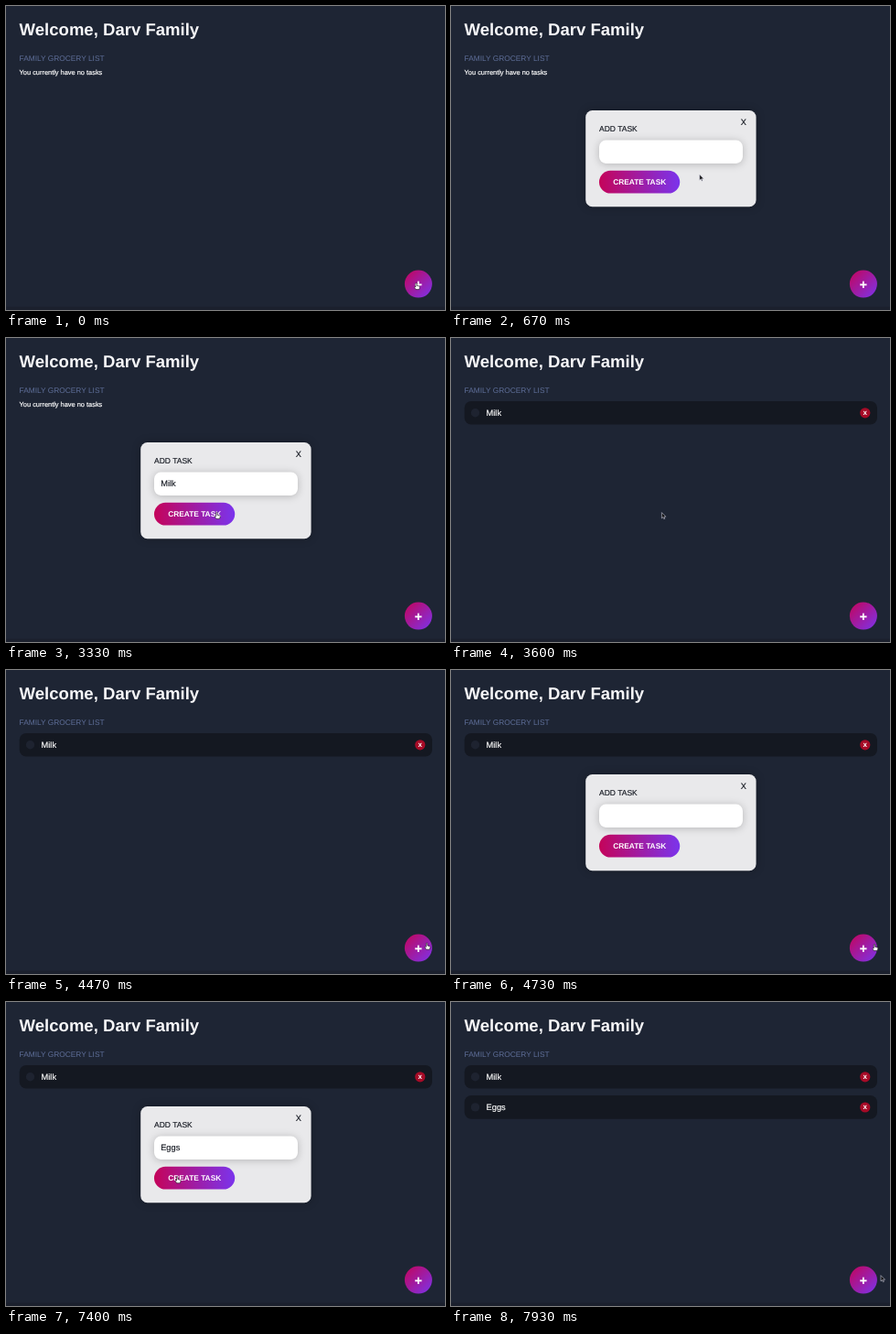
An HTML page for the animation above (8000 ms loop, 480 by 332 pixels).

```html
<!DOCTYPE html>
<html lang="en">
<head>
<meta charset="utf-8">
<title>Grocery list</title>
<style>
  html, body { margin: 0; width: 100%; height: 100%; overflow: hidden; background: #1e2534; }
  svg { display: block; width: 100vw; height: 100vh; }
  text { font-family: "Liberation Sans", Arial, Helvetica, sans-serif; font-size: 9.28px; text-rendering: geometricPrecision; white-space: pre; }
  .light { fill: #fff; stroke: #fff; stroke-width: .18px; }
  .dark { fill: #10141d; stroke: #10141d; stroke-width: .12px; }
  .bold { font-weight: 700; text-anchor: middle; fill: #fff; }
  .panel { filter: drop-shadow(0 0 4px rgba(0, 0, 0, .3)); }
  .field { filter: drop-shadow(0 1.5px 4px rgba(0, 0, 0, .22)); }
</style>
</head>
<body>
<svg viewBox="0 0 480 332">
  <defs>
    <linearGradient id="across"><stop stop-color="#c4045a"/><stop offset="1" stop-color="#7b34ec"/></linearGradient>
    <linearGradient id="diagonal" x2="1" y2="1"><stop stop-color="#c4045a"/><stop offset="1" stop-color="#7b34ec"/></linearGradient>
    <g id="row">
      <rect x="14.7" y="68.9" width="451.3" height="25.6" rx="7.4" fill="#141821"/>
      <circle cx="26.5" cy="81.7" r="4.7" fill="#1e2330"/>
      <circle cx="452.8" cy="81.8" r="5.6" fill="#a60b27"/>
      <text class="bold" x="452.8" y="84.1" style="font-size:8px">x</text>
    </g>
  </defs>

  <rect width="480" height="332" fill="#1e2534"/>
  <rect y="328.5" width="480" height="3.5" fill="#1b202d"/>
  <text x="14.6" y="32.1" fill="#f6f6f8" style="font-size:18.56px;font-weight:700">Welcome, Darv Family</text>
  <text x="14.5" y="59.5" fill="#5e6e98" style="font-size:8.35px">FAMILY GROCERY LIST</text>
  <text id="empty" class="light" x="14.6" y="75.2" style="font-size:7.42px">You currently have no tasks</text>

  <g id="milk"><use href="#row"/><text class="light" x="38.6" y="84.8">Milk</text></g>
  <g id="eggs" transform="translate(0 33.2)"><use href="#row"/><text class="light" x="38.6" y="84.8">Eggs</text></g>

  <circle cx="450.9" cy="303.6" r="15" fill="url(#diagonal)"/>
  <text class="bold" x="450.9" y="308.9" stroke="#fff" stroke-width=".25" style="font-size:14px">+</text>

  <g id="modal">
    <rect class="panel" x="147.2" y="114" width="186.4" height="105.2" rx="7.4" fill="#e9e9eb"/>
    <text class="dark" x="316.7" y="130">X</text>
    <text class="dark" x="162" y="136.9" style="font-size:8.5px">ADD TASK</text>
    <rect class="field" x="162" y="146.5" width="157" height="25.5" rx="7.4" fill="#fff"/>
    <text id="typed" class="dark" x="169.2" y="162.3"></text>
    <rect id="caret" y="153.6" width=".7" height="11" fill="#222"/>
    <rect x="162" y="179.8" width="88.2" height="24.7" rx="12.35" fill="url(#across)"/>
    <text class="bold" x="206.2" y="194.9" style="font-size:8.35px">CREATE TASK</text>
  </g>

  <g id="pointer">
    <path id="arrow" d="M0 0V6.3L1.5 5 2.4 7.1 3.4 6.7 2.5 4.6H4.5Z" fill="#111" stroke="#dde" stroke-width=".55"/>
    <path id="hand" d="M-.7 0Q0-.8.7 0V2.6L3.2 3.2Q4 3.6 3.8 4.6L3.2 6.8H-.6L-2.2 4.2Q-2 3.2-.7 4.1Z" fill="#fff" stroke="#111" stroke-width=".6"/>
    <path id="beam" d="M-1.3-4Q0-4 0-3Q0-4 1.3-4M0-3V3M-1.3 4Q0 4 0 3Q0 4 1.3 4" fill="none" stroke="#333" stroke-width=".7"/>
  </g>
</svg>
<script>
const LOOP = 8000, STEP = 200 / 3;
const el = id => document.getElementById(id);
const show = (id, on) => el(id).setAttribute('display', on ? 'inline' : 'none');
const within = (t, spans) => spans.some(([from, to]) => t >= from && t < to);

const modalOpen = [[70, 3530], [4670, 7530]];
const pointerHidden = [[2070, 3000], [6000, 6930]];

// [time, field content]; null means the field has no focus
const typing = [
  [0, null], [1330, ''], [2070, 'M'], [2270, 'Mi'], [2470, 'Mil'], [2600, 'Milk'],
  [3530, null], [5470, ''], [6000, 'E'], [6270, 'Eg'], [6400, 'Egg'], [6530, 'Eggs'], [7530, null]
];

// [time, x, y]
const path = [
  [0, 448.6, 302.8], [400, 448.6, 302.8], [870, 233, 158], [2940, 233, 158], [3330, 230.4, 190.6],
  [4000, 230.4, 190.6], [4530, 463, 299.8], [4870, 463, 299.8], [5400, 283, 158], [6860, 283, 158],
  [7270, 187.2, 191], [7520, 187.2, 191], [7930, 470, 298.6], [8000, 470, 298.6]
];

function pointerAt(t) {
  const i = Math.max(1, path.findIndex(p => p[0] > t));
  const [t0, x0, y0] = path[i - 1], [t1, x1, y1] = path[i];
  const u = 1 - (1 - (t - t0) / (t1 - t0)) ** 2;
  return [x0 + (x1 - x0) * u, y0 + (y1 - y0) * u];
}

function pointerShape(x, y, open) {
  const inside = (left, top, right, bottom) => open && x > left && x < right && y > top && y < bottom;
  if (inside(162, 146, 319, 172)) return 'beam';
  if (inside(162, 180, 250, 204) || Math.hypot(x - 451, y - 304) < 15) return 'hand';
  return 'arrow';
}

function draw(t) {
  const open = within(t, modalOpen);
  show('modal', open);
  show('empty', t < 3530);
  show('milk', t >= 3530);
  show('eggs', t >= 7530);

  const [since, value] = typing.filter(k => k[0] <= t).pop();
  el('typed').textContent = value || '';
  el('caret').setAttribute('x', 169.4 + (value ? el('typed').getComputedTextLength() : 0));
  show('caret', value !== null && (t - since) % 1000 < 500);

  const [x, y] = pointerAt(t), shape = pointerShape(x, y, open);
  el('pointer').setAttribute('transform', `translate(${x} ${y})`);
  show('pointer', !within(t, pointerHidden));
  for (const id of ['arrow', 'hand', 'beam']) show(id, id === shape);
}

// The screen updates 15 times a second
const start = performance.now();
function tick() {
  const t = (performance.now() - start) % LOOP;
  draw(Math.min(LOOP - 1, Math.floor((t + 4) / STEP) * STEP + 4));
  requestAnimationFrame(tick);
}
tick();
</script>
</body>
</html>
```
